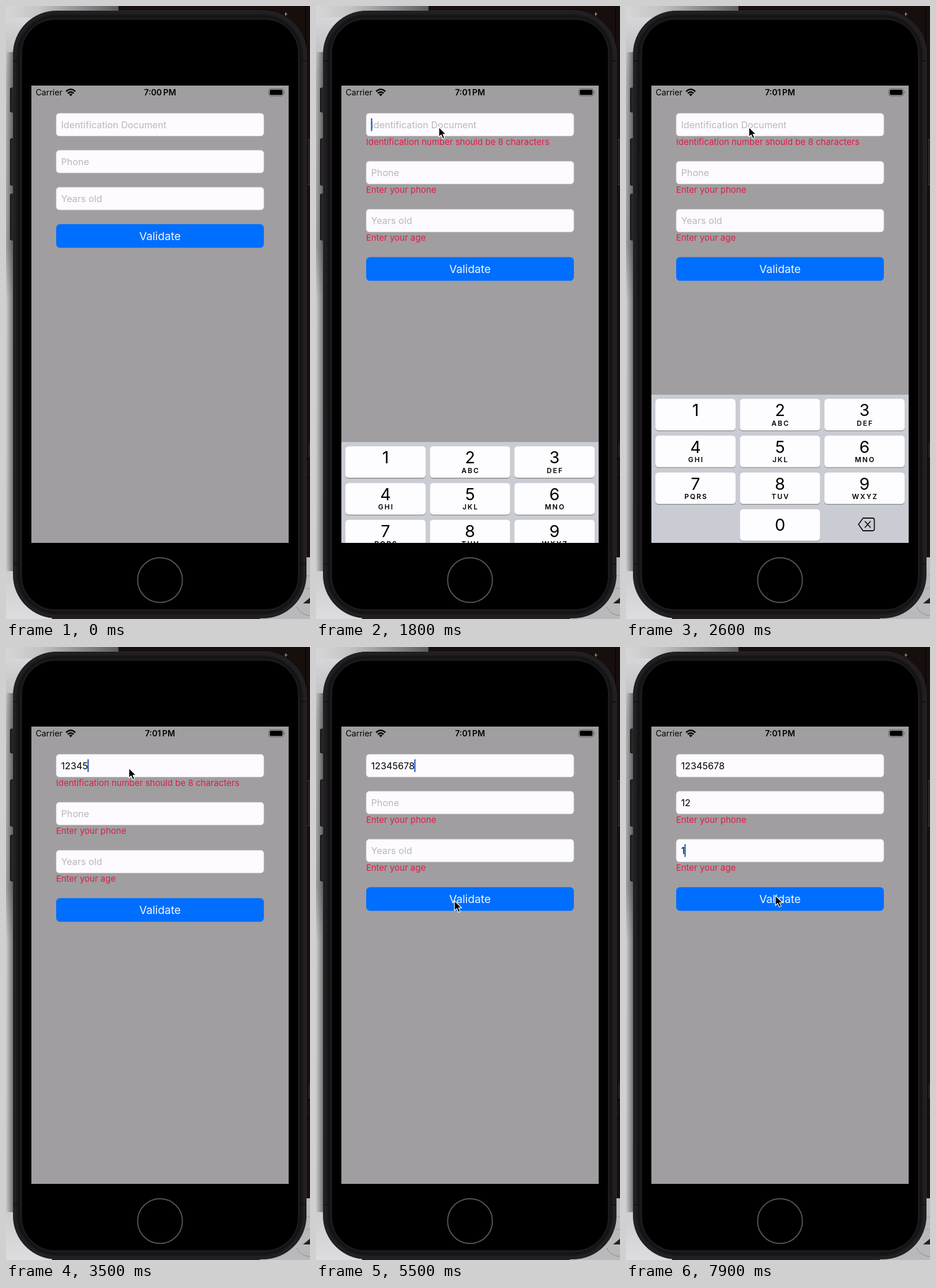
An HTML page that plays this animation: 527 px wide and 1063 px high, repeating every 8000 ms.

```html
<!DOCTYPE html>
<html lang="en">
<head>
<meta charset="utf-8">
<title>Form validation</title>
<style>
  html, body { margin: 0; width: 100%; height: 100%; overflow: hidden; background: #120c0c; }
  svg { display: block; width: 527px; height: 1063px; }
  text { font-family: Inter, "Open Sans", sans-serif; white-space: pre; }
  .input { font-size: 16.2px; }
  .error { font-size: 15px; fill: #e01c48; }
  .num { font-size: 28.8px; text-anchor: middle; }
  .abc { font-size: 12px; font-weight: 600; letter-spacing: 2px; text-anchor: middle; }
</style>
</head>
<body>
<svg id="stage" viewBox="0 0 527 1063" xmlns="http://www.w3.org/2000/svg">
  <defs>
    <linearGradient id="top" x1="0" x2="1" y1="0" y2="0">
      <stop offset="0" stop-color="#d6d6d8"/><stop offset=".3" stop-color="#c4c4c6"/>
      <stop offset="1" stop-color="#5c5b5d"/>
    </linearGradient>
    <linearGradient id="side" x1="0" x2="0" y1="0" y2="1">
      <stop offset="0" stop-color="#d6d6d8"/><stop offset=".1" stop-color="#b4b3b5"/>
      <stop offset=".38" stop-color="#a4a3a5"/><stop offset=".47" stop-color="#cfced0"/>
      <stop offset=".9" stop-color="#c9c8ca"/><stop offset="1" stop-color="#dddde0"/>
    </linearGradient>
    <linearGradient id="shade" x1="0" x2="1" y1="0" y2="0">
      <stop offset="0" stop-color="#000" stop-opacity="0"/>
      <stop offset="1" stop-color="#000" stop-opacity=".5"/>
    </linearGradient>
    <clipPath id="screen"><rect x="44" y="138" width="446" height="793"/></clipPath>
  </defs>

  <!-- desktop behind the phone -->
  <rect width="527" height="1063" fill="#170f0e"/>
  <rect width="195" height="90" fill="url(#top)"/>
  <rect y="20" width="80" height="1043" fill="url(#side)"/>
  <rect y="80" width="14" height="900" fill="url(#shade)"/>
  <path d="M519.500 0V955" stroke="#000"/>
  <path d="M521 785H527M521 818H527" stroke="#000"/>
  <path d="M527 232H523Q525 232 525 236V306Q525 310 523 310H527" fill="none" stroke="#4a4647"/>
  <path d="M525.500 758V783" stroke="#3a3637"/>
  <rect x="440" y="956" width="87" height="107" fill="#b9b8ba"/>
  <path d="M519 988H527M519 1010H527" stroke="#99989a"/>
  <path d="M515 1036L527 1026V1036Z" fill="#222"/>
  <path d="M504 1042Q510 1056 527 1057" fill="none" stroke="#8c8b8d"/>

  <!-- phone -->
  <g fill="#242225" stroke="#0c0b0c">
    <rect x="7.500" y="142" width="9" height="42" rx="2"/>
    <rect x="7.500" y="230" width="9" height="81" rx="2"/>
    <rect x="7.500" y="326" width="9" height="80" rx="2"/>
  </g>
  <rect x="12.500" y="8.500" width="508" height="1053" rx="75" fill="#1b191c" stroke="#353337"/>
  <rect x="16" y="12" width="501" height="1046" rx="72" fill="none" stroke="#232124" stroke-width="3"/>
  <rect x="22" y="18" width="489" height="1034" rx="66" fill="none" stroke="#141215" stroke-width="3"/>
  <path d="M13 95H21M512 95H520M13 967H21M512 967H520" stroke="#111012" stroke-width="2"/>
  <rect x="28" y="24" width="478" height="1022" rx="57"/>
  <path d="M485 11V17M483 14H488" stroke="#aaa6a4" stroke-width="1.200"/>
  <circle cx="267" cy="995.500" r="38.800" fill="#000" stroke="#555456" stroke-width="2"/>

  <rect x="44" y="138" width="446" height="793" fill="#a09ea0"/>
  <g id="status">
    <text x="51.500" y="155" font-size="14.200">Carrier</text>
    <g fill="none" stroke="#000" stroke-width="2.500">
      <path d="M104.200 148.300Q112.200 140.800 120.200 148.300"/>
      <path d="M107.100 151.500Q112.200 146.800 117.300 151.500"/>
    </g>
    <path d="M109.200 153.300Q112.200 150.600 115.200 153.300L112.200 156.500Z"/>
    <text id="clock" x="267" y="155" font-size="14.200" font-weight="600" text-anchor="middle"></text>
    <rect x="455.500" y="143.500" width="25.500" height="12.500" rx="3.500" fill="none" stroke="#5e5d5f"/>
    <rect x="457.300" y="145.300" width="22" height="9" rx="2"/>
    <path d="M482.300 147.500Q484.600 149.700 482.300 152Z" fill="#5e5d5f"/>
  </g>
  <g id="form"></g>
  <g clip-path="url(#screen)"><g id="keys"></g></g>
  <path id="pointer" d="M0 0V17.200L4 13.500L6.800 20L9.900 18.700L7.100 12.300H12.400Z"
        fill="#000" stroke="#fff" stroke-width="1.200" stroke-linejoin="round"/>
</svg>
<script>
const LOOP = 8000, STEP = 100;
const ROW = 64.1, NOTE = 19.1, KEYBOARD = 257;
const SHOW_ERRORS = 500, FIRST_VALID = 5500;

const $ = id => document.getElementById(id);
function add(parent, tag, attrs, label) {
  const el = document.createElementNS("http://www.w3.org/2000/svg", tag);
  for (const k in attrs) el.setAttribute(k, attrs[k]);
  if (label) el.textContent = label;
  return parent.appendChild(el);
}

// typed: times at which each character lands; focus: [from, to]
const fields = [
  { hint: "Identification Document", error: "Identification number should be 8 characters",
    chars: "12345678", typed: [2800, 3200, 3300, 3400, 3500, 3800, 4200, 4300], focus: [1700, 6100] },
  { hint: "Phone", error: "Enter your phone", chars: "12", typed: [6400, 6500], focus: [6100, 7300] },
  { hint: "Years old", error: "Enter your age", chars: "1", typed: [7500], focus: [7300, LOOP] }
];

for (const f of fields) {
  f.g = add($("form"), "g", {});
  add(f.g, "rect", { x: 87, width: 360, height: 39.5, rx: 5.5, fill: "#fdfbff", stroke: "#cfcdd0", "stroke-width": .7 });
  f.text = add(f.g, "text", { x: 95.5, y: 25.7, class: "input" });
  f.caret = add(f.g, "rect", { y: 8.5, width: 2.3, height: 22.5, rx: 1, fill: "#2a61c9" });
  f.note = add(f.g, "text", { x: 86.7, y: 55, class: "error" }, f.error);
}
const button = add($("form"), "g", {});
add(button, "rect", { x: 87, width: 360, height: 41, rx: 6.5, fill: "#006eff" });
add(button, "text", { x: 267, y: 27.4, "font-size": 19.2, "text-anchor": "middle", fill: "#f4f6ff" }, "Validate");

function buildKeys() {
  const g = $("keys");
  add(g, "rect", { x: 44, y: 674, width: 446, height: KEYBOARD, fill: "#c9ccd3" });
  const letters = ["", "ABC", "DEF", "GHI", "JKL", "MNO", "PQRS", "TUV", "WXYZ"];
  const key = (col, row, num, abc) => {
    const x = 51 + col * 146.5, y = 681.3 + row * 63.8, mid = x + 69.5;
    add(g, "rect", { x, y: y + 1.3, width: 139, height: 54.7, rx: 5.5, fill: "#8b8d92" });
    add(g, "rect", { x, y, width: 139, height: 54.7, rx: 5.5, fill: "#fdfcfe" });
    add(g, "text", { x: mid, y: y + (row < 3 ? 29.6 : 37.4), class: "num" }, num);
    if (abc) add(g, "text", { x: mid + 1, y: y + 46.3, class: "abc" }, abc);
  };
  letters.forEach((abc, i) => key(i % 3, Math.floor(i / 3), String(i + 1), abc));
  key(1, 3, "0");
  add(g, "path", {
    d: "M411 888H427Q430.500 888 430.500 891.500V906.500Q430.500 910 427 910H411L403 899ZM414.500 894L423.500 904M423.500 894L414.500 904",
    fill: "none", stroke: "#111", "stroke-width": 1.8, "stroke-linejoin": "round", "stroke-linecap": "round"
  });
}
buildKeys();

const path = [
  [100, 252, 396], [1000, 252, 396], [1500, 213, 210], [4500, 213, 210], [5000, 219, 310],
  [5300, 240, 440], [5600, 240, 440], [6100, 268, 275], [6800, 268, 275], [7200, 288, 350],
  [7500, 288, 350], [7600, 284, 383], [7800, 262, 426], [7900, 259, 431]
];
const clamp = v => Math.max(0, Math.min(1, v));
const smooth = p => p * p * (3 - 2 * p);

function pointerAt(t) {
  let i = 0;
  while (i < path.length - 2 && t >= path[i + 1][0]) i++;
  const [t0, x0, y0] = path[i], [t1, x1, y1] = path[i + 1];
  const p = clamp((t - t0) / (t1 - t0));
  const long = t1 - t0 > 350 && i !== 3;
  const k = long ? smooth(p) : p;
  return [x0 + (x1 - x0) * k, y0 + (y1 - y0) * k];
}

// solid for a while, fades out, rests, fades in
function blink(age) {
  const a = age % 1100;
  return a < 650 ? 1 : a < 950 ? clamp((800 - a) / 150) : (a - 950) / 150;
}

function keyboardDrop(t) {
  const up = 1 - (1 - clamp((t - 1700) / 316)) ** 3;
  const down = 1 - (1 - clamp((t - 2750) / 316)) ** 3;
  return KEYBOARD * (1 - up + down);
}

function draw(t) {
  $("clock").textContent = t < 100 ? "7:00\u2009PM" : "7:01\u2009PM";
  let y = 186;
  fields.forEach((f, i) => {
    const n = f.typed.filter(at => t >= at).length;
    const noted = t >= SHOW_ERRORS && !(i === 0 && t >= FIRST_VALID);
    f.g.setAttribute("transform", `translate(0 ${y})`);
    f.text.textContent = n ? f.chars.slice(0, n) : f.hint;
    f.text.setAttribute("fill", n ? "#000" : "#b9b7bc");
    f.note.setAttribute("opacity", noted ? 1 : 0);
    const active = t >= f.focus[0] && t < f.focus[1];
    const since = n ? f.typed[n - 1] : f.focus[0];
    f.caret.setAttribute("opacity", active ? blink(t - since) : 0);
    f.caret.setAttribute("x", 95.2 + (n ? f.text.getComputedTextLength() - .5 : 0));
    y += ROW + (noted ? NOTE : 0);
  });
  button.setAttribute("transform", `translate(0 ${y})`);
  $("keys").setAttribute("transform", `translate(0 ${keyboardDrop(t)})`);
  $("pointer").setAttribute("transform", `translate(${pointerAt(t)})`);
  $("pointer").setAttribute("opacity", t < 100 ? 0 : 1);
}

const start = performance.now();
function tick() {
  const t = (performance.now() - start) % LOOP;
  draw(Math.floor(t / STEP) * STEP);
  requestAnimationFrame(tick);
}
tick();
</script>
</body>
</html>
```
